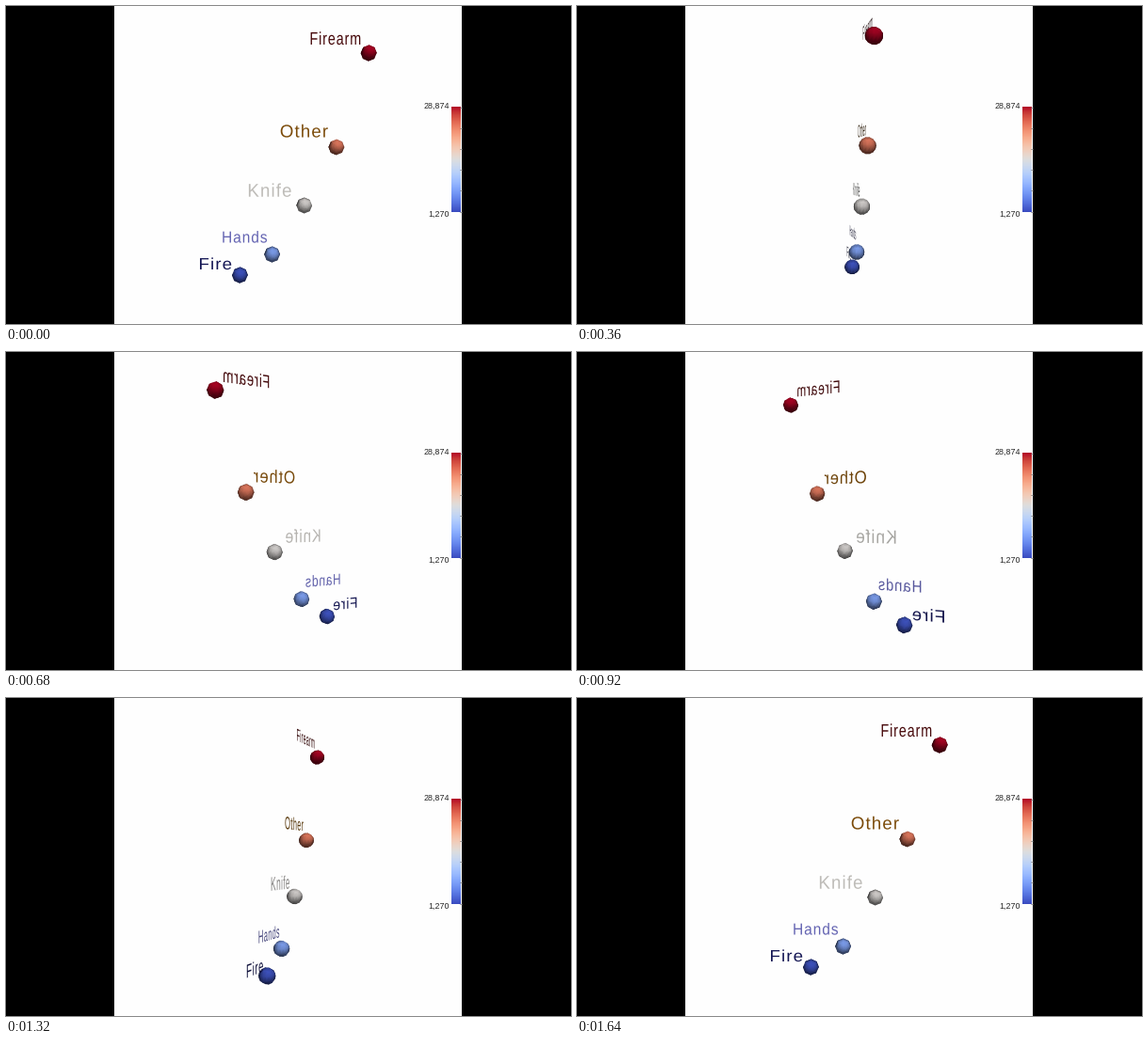
Recreate the animation shown at these times as a matplotlib script. Size 600 by 338 pixels, loop 1680 ms.

```python
import numpy as np
import matplotlib.pyplot as plt
from matplotlib.animation import FuncAnimation
from matplotlib.collections import TriMesh
from matplotlib.patches import PathPatch, Rectangle
from matplotlib.path import Path
from matplotlib.textpath import TextPath
from matplotlib.tri import Triangulation

W, H, DPI = 600, 338, 100
FRAMES, INTERVAL = 42, 40
ORBIT = 49                            # camera stops in one full turn
CX, CY = 299.7, 169
DIST = CY / np.tan(np.radians(15))    # 30 degree field of view
RADIUS = 8.0
TRACKING = 0.06                       # extra letter space in em

plt.rcParams["font.family"] = "Liberation Sans"
COOLWARM = plt.get_cmap("coolwarm")

# word, ball centre, colour value, text left and baseline, text scale, text colour
ITEMS = [
    ("Firearm", (385.2, 50), 1.0, (323.6, 41), (14.4, 19.0), (70, 8, 10)),
    ("Other", (350.9, 150), 0.81, (291.7, 139.5), (18.7, 19.0), (124, 76, 10)),
    ("Knife", (316.7, 212), 0.51, (257.9, 202.7), (18.7, 19.7), (190, 188, 184)),
    ("Hands", (282.6, 264), 0.23, (230.3, 251.5), (15.5, 17.2), (100, 100, 178)),
    ("Fire", (248.4, 286), 0.03, (206, 280), (18.7, 17.4), (20, 22, 84)),
]


def direction(azimuth, elevation):
    a, e = np.radians([azimuth, elevation])
    return np.array([np.sin(a) * np.cos(e), np.sin(e), np.cos(a) * np.cos(e)])


# intensity and direction of lights fixed to the camera
LIGHTS = [(0.75, direction(10, 50)), (0.25, direction(0, -75)),
          (0.25, direction(0, 0)), (0.21, direction(110, 0)),
          (0.21, direction(-110, 0))]


def light(normals):
    return sum(i * np.clip(normals @ d, 0, None) for i, d in LIGHTS)


FRONT = light(np.array([0, 0, 1.0]))


def sphere(n_around=8, n_rings=8):
    """Unit ball with its poles on the z axis."""
    phi = np.linspace(0, np.pi, n_rings)[:, None]
    th = np.arange(n_around) * 2 * np.pi / n_around
    pts = np.stack([np.sin(phi) * np.cos(th), np.sin(phi) * np.sin(th),
                    np.cos(phi) + 0 * th], axis=-1).reshape(-1, 3)
    tris = []
    for i in range(n_rings - 1):
        for j in range(n_around):
            a, b = i * n_around + j, i * n_around + (j + 1) % n_around
            c, d = a + n_around, b + n_around
            if i < n_rings - 2:
                tris.append((a, c, d))
            if i > 0:
                tris.append((a, d, b))
    return pts, np.array(tris)


BALL, TRIS = sphere()


def turn(p, angle):
    c, s = np.cos(angle), np.sin(angle)
    x, y, z = p[..., 0], p[..., 1], p[..., 2]
    return np.stack([x * c - z * s, y, x * s + z * c], axis=-1)


def project(p):
    k = DIST / (DIST - p[..., 2])
    return np.stack([CX + p[..., 0] * k, CY - p[..., 1] * k], axis=-1)


def glyphs(word):
    """Outline of a word in em units, letterspaced, ink starting at x = 0."""
    verts, codes = [], []
    for i, letter in enumerate(word):
        glyph = TextPath((0, 0), letter, size=1)
        end = TextPath((0, 0), word[:i + 1], size=1).get_extents().x1
        shift = end - glyph.get_extents().x1 + i * TRACKING
        verts.append(glyph.vertices + [shift, 0])
        codes.append(glyph.codes)
    verts = np.concatenate(verts)
    left = TextPath((0, 0), word[0], size=1).get_extents().x0
    return verts - [left, 0], np.concatenate(codes)


def word_path(word, pos, scale):
    verts, codes = glyphs(word)
    v = verts * scale
    pts = np.column_stack([pos[0] - CX + v[:, 0], CY - pos[1] + v[:, 1],
                           np.zeros(len(v))])
    return pts, codes


WORDS = [word_path(word, pos, scale) for word, _, _, pos, scale, _ in ITEMS]

fig = plt.figure(figsize=(W / DPI, H / DPI), dpi=DPI, facecolor="black")
ax = fig.add_axes([0, 0, 1, 1])
ax.add_patch(Rectangle((115, 0), 369, H, color="#fefefe", lw=0, zorder=0))
ax.imshow(np.linspace(1, 0, 256)[:, None], cmap=COOLWARM, aspect="auto",
          extent=(473, 483, 219, 107), zorder=1)
for y in np.linspace(107.5, 218.5, 6):
    ax.plot([481.5, 484], [y, y], color="#777777", lw=0.5, zorder=2)
for label, y in (("28,874", 109.3), ("1,270", 224.3)):
    ax.text(470.6, y, label, size=8.9 * 72 / DPI, color="#282828",
            ha="right", va="baseline", zorder=2)
ax.set(xlim=(0, W), ylim=(H, 0))
ax.axis("off")

moving = []


def make_ball(centre, value, angle):
    mid = turn(np.array([centre[0] - CX, CY - centre[1], 0.0]), angle)
    normals = turn(BALL, angle)
    pts = mid + RADIUS * normals
    corners = pts[TRIS]
    face = np.cross(corners[:, 1] - corners[:, 0], corners[:, 2] - corners[:, 0])
    centroid = corners.mean(axis=1)
    face *= np.sign(np.sum(face * (centroid - mid), axis=1))[:, None]
    seen = np.sum(face * ([0, 0, DIST] - centroid), axis=1) > 0
    base = np.array(COOLWARM(value)[:3])
    rgb = np.clip(base * (0.02 + light(normals))[:, None], 0, 1)
    xy = project(pts)
    mesh = TriMesh(Triangulation(xy[:, 0], xy[:, 1], TRIS[seen]), facecolor=rgb)
    return mid[2], mesh


def make_word(word, colour, angle):
    pts, codes = word
    pts = turn(pts, angle)
    normal = turn(np.array([0, 0, 1.0]), angle)
    if normal[2] < 0:
        normal = -normal
    rgb = np.clip(np.array(colour) / 255 * light(normal) / FRONT, 0, 1)
    patch = PathPatch(Path(project(pts), codes), facecolor=rgb, lw=0)
    return pts[:, 2].mean(), patch


def draw(frame):
    while moving:
        moving.pop().remove()
    angle = 2 * np.pi * round(1.2 * frame) / ORBIT
    parts = []
    for (_, centre, value, _, _, colour), word in zip(ITEMS, WORDS):
        parts.append(make_ball(centre, value, angle))
        parts.append(make_word(word, colour, angle))
    parts.sort(key=lambda part: part[0])
    for order, (_, artist) in enumerate(parts):
        artist.set_zorder(5 + order)
        if isinstance(artist, TriMesh):
            ax.add_collection(artist, autolim=False)
        else:
            ax.add_artist(artist)
        moving.append(artist)
    return moving


anim = FuncAnimation(fig, draw, frames=FRAMES, interval=INTERVAL,
                     init_func=lambda: draw(0), repeat=True, repeat_delay=0,
                     blit=False)
plt.show()
```
